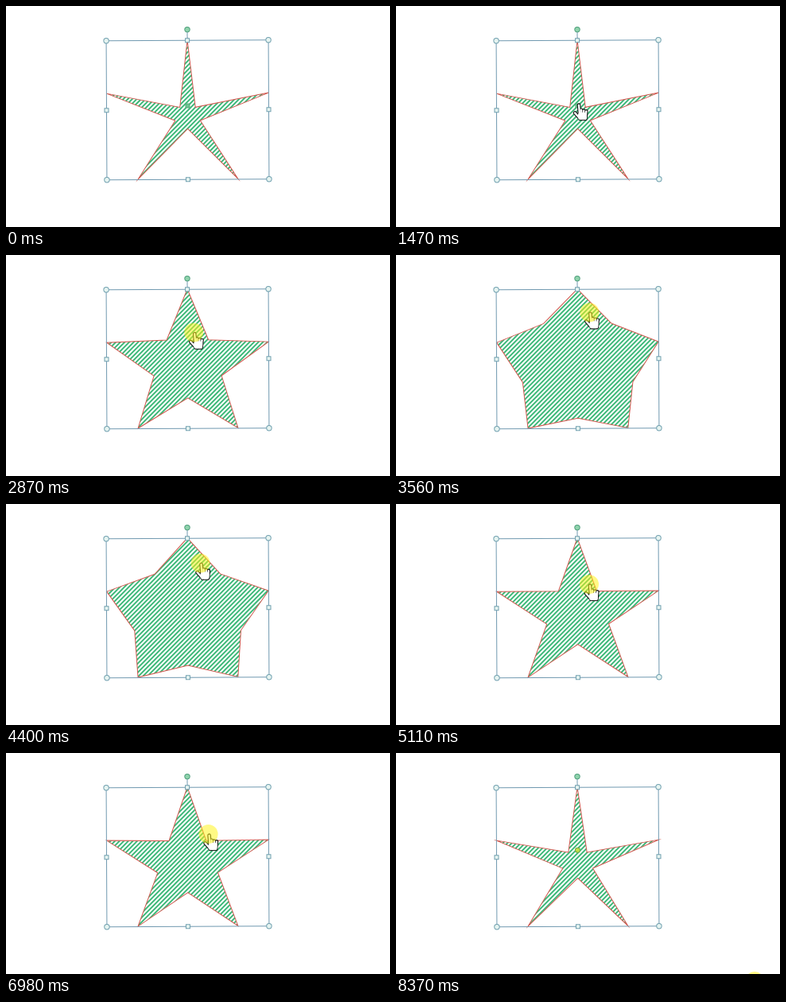
Animation of 483 by 278 pixels, one loop 8460 ms. Source, as an HTML page with a canvas:

```html
<!DOCTYPE html>
<html>
<head>
<meta charset="utf-8">
<title>Star handle drag</title>
<style>
html, body { margin: 0; width: 100%; height: 100%; overflow: hidden; background: #fff; }
canvas { display: block; width: 483px; height: 278px; }
</style>
</head>
<body>
<canvas id="stage" width="483" height="278"></canvas>
<script>
const ctx = document.getElementById('stage').getContext('2d');
const W = 483, H = 278, LOOP = 8460;
const TICK = LOOP / 109; // the picture advances in equal ticks
const CX = 228.5, CY = 130.8, HALF_W = 102, HALF_H = 87.5, TILT = -0.005;
const STAR = { y: 8.7, rx: 107, ry: 96.7 };
const STRIPE = { gap: 5.63, width: 1.95, phase: 12 };

// Pointer moves, with first and last tick
const START = { x: 374, y: 265 };
const MOVES = [
  { from: 10, to: 19, x: 229, y: 123 },
  { from: 29, to: 48, x: 245, y: 66.5 },
  { from: 54, to: 66, x: 243, y: 101 },
  { from: 69, to: 82, x: 278, y: 78 },
  { from: 87, to: 93, x: 237, y: 120 },
  { from: 97, to: 101, x: 426, y: 299 }
];
const [ENTER, DRAG] = MOVES, LEAVE = MOVES[MOVES.length - 1];
const PRESS = 24, CLICK = 108;

function pointerAt(n) {
  let { x, y } = START;
  for (const m of MOVES) {
    if (n < m.from) break;
    const k = Math.min(1, (n - m.from + 1) / (m.to - m.from + 1));
    x += (m.x - x) * k;
    y += (m.y - y) * k;
  }
  return { x, y };
}

function ratioAt(n) {
  const y = pointerAt(Math.min(Math.max(n, ENTER.to), LEAVE.from - 1)).y;
  return (138 - y) / STAR.ry;
}

function paint(fill, stroke) {
  ctx.fillStyle = fill;
  ctx.strokeStyle = stroke;
  ctx.lineWidth = 1;
  ctx.fill();
  ctx.stroke();
}

function disc(x, y, r, fill, stroke) {
  ctx.beginPath();
  ctx.arc(x, y, r, 0, Math.PI * 2);
  paint(fill, stroke);
}

function box(x, y, fill, stroke) {
  ctx.beginPath();
  ctx.rect(x - 2.5, y - 2.5, 5, 5);
  paint(fill, stroke);
}

function starPath(ratio) {
  const path = new Path2D();
  for (let i = 0; i < 10; i++) {
    const a = i * Math.PI / 5, r = i % 2 ? ratio : 1;
    path.lineTo(Math.sin(a) * STAR.rx * r, STAR.y - Math.cos(a) * STAR.ry * r);
  }
  path.closePath();
  return path;
}

function drawStar(ratio) {
  const path = starPath(ratio);
  ctx.save();
  ctx.clip(path);
  ctx.beginPath();
  for (let i = -40; i <= 40; i++) {
    const x = STRIPE.phase + i * STRIPE.gap;
    ctx.moveTo(x - 120, 120);
    ctx.lineTo(x + 120, -120);
  }
  ctx.strokeStyle = '#3cb878';
  ctx.lineWidth = STRIPE.width;
  ctx.stroke();
  ctx.restore();
  ctx.strokeStyle = '#d2574f';
  ctx.lineWidth = 1;
  ctx.stroke(path);
}

function drawSelection() {
  const line = '#7099b0', fill = '#e6f4f1', edge = '#6f9fae';
  ctx.strokeStyle = line;
  ctx.lineWidth = 1;
  ctx.strokeRect(-HALF_W, -HALF_H, HALF_W * 2, HALF_H * 2);
  ctx.beginPath();
  ctx.moveTo(0, -HALF_H);
  ctx.lineTo(0, -98);
  ctx.stroke();
  for (const s of [-1, 1]) {
    for (const v of [-1, 1]) disc(s * HALF_W, v * HALF_H, 3.2, fill, edge);
    box(s * HALF_W, 0, fill, edge);
    box(0, s * HALF_H, fill, edge);
  }
  disc(0, -101.2, 3.2, '#8fd3ac', '#4f9f7c');
}

// Fingers are thick round lines; the gaps between them show as knuckles
function drawHand(x, y) {
  ctx.save();
  ctx.translate(x + 1, y - 1);
  ctx.lineCap = ctx.lineJoin = 'round';
  ctx.beginPath();
  for (let i = 0; i < 4; i++) {
    ctx.moveTo(i * 3.1, i ? 8 + i * 0.8 : 2.6);
    ctx.lineTo(1.5 + i * 2.3, 20);
  }
  ctx.moveTo(-5, 12.4);
  ctx.lineTo(0, 18);
  for (const [color, width] of [['#111', 4.6], ['#fff', 2.4]]) {
    ctx.strokeStyle = color;
    ctx.lineWidth = width;
    ctx.stroke();
  }
  ctx.fillStyle = '#fff';
  ctx.beginPath();
  ctx.roundRect(-1, 12, 11, 9, 3);
  ctx.fill();
  ctx.restore();
}

function drawGlow(x, y) {
  ctx.fillStyle = 'rgba(255, 244, 20, 0.52)';
  ctx.beginPath();
  ctx.arc(x, y, 12, 0, Math.PI * 2);
  ctx.fill();
}

function draw(t) {
  const n = Math.floor(t / TICK + 0.27);
  const { x, y } = pointerAt(n);
  ctx.fillStyle = '#fff';
  ctx.fillRect(0, 0, W, H);

  ctx.save();
  ctx.translate(CX, CY);
  ctx.rotate(TILT);
  drawStar(ratioAt(n));
  drawSelection();
  if (n < DRAG.from) box(0, -5.3, '#6cc591', '#58a878');
  else if (n >= LEAVE.from) disc(0, -8.5, 3, '#bfe04a', '#6fa548');
  ctx.restore();

  if (n >= ENTER.from && n < LEAVE.to) drawHand(x, y);
  if (n >= PRESS && n < LEAVE.from) drawGlow(x, y);
  if (n >= CLICK) drawGlow(451, 287);
}

const begin = performance.now();
function tick() {
  draw((performance.now() - begin) % LOOP);
  requestAnimationFrame(tick);
}
tick();
</script>
</body>
</html>
```
